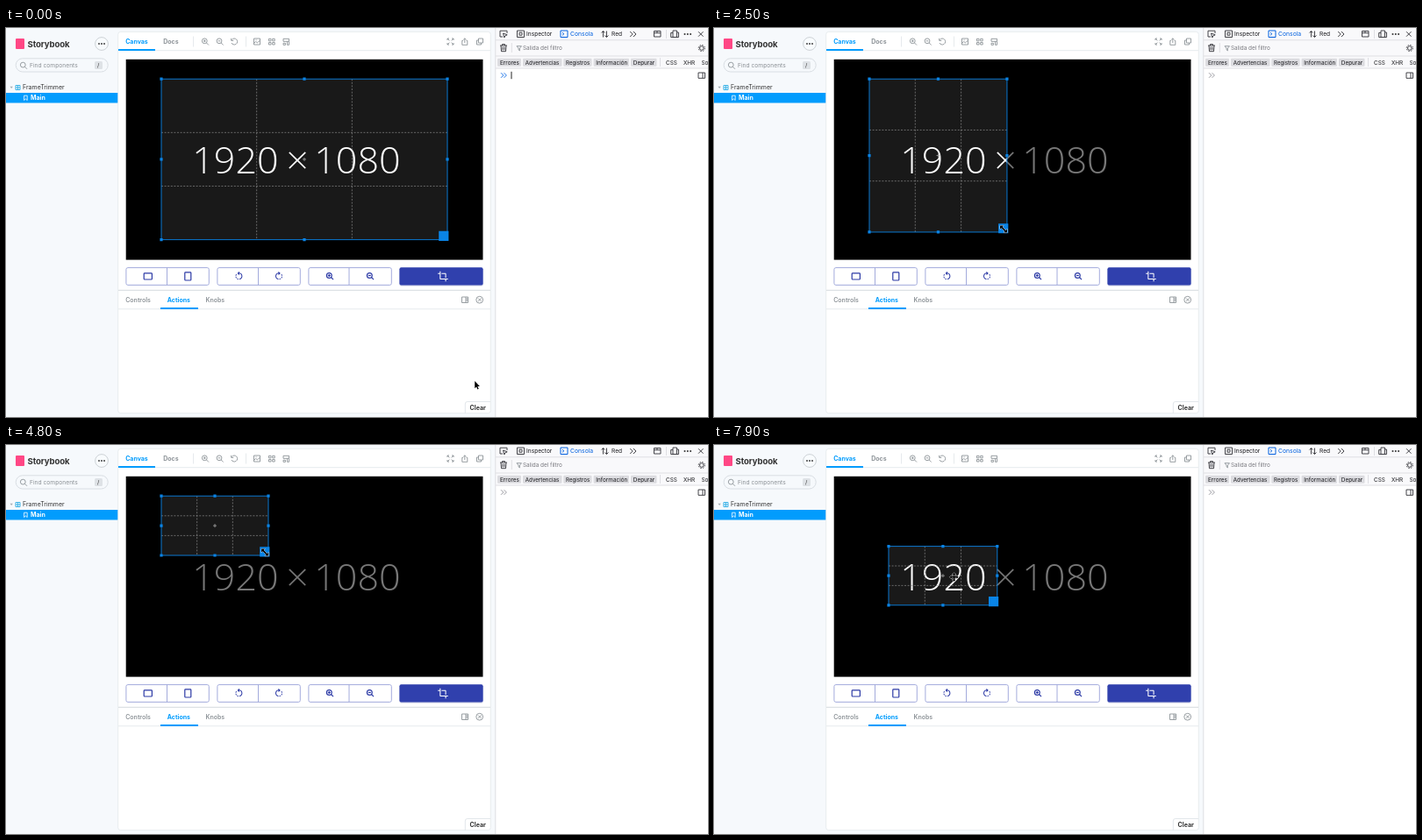
Write an HTML page that moves like this. It is 800x444 px and loops after 8000 ms.

```html
<!DOCTYPE html>
<html lang="es">
<head>
<meta charset="utf-8">
<title>Cropper demo</title>
<style>
  html, body { margin: 0; width: 100%; height: 100%; overflow: hidden; background: #f6f9fc; }
  svg { display: block; width: 800px; height: 444px; }
  text { font-family: Inter, "Open Sans", sans-serif; font-size: 7px; fill: #333; }
  .b { font-weight: 700; }
  .tool text { font-size: 6.4px; fill: #18181c; }
  .digits text { font: 300 43px "Open Sans", "Noto Sans", sans-serif; fill: inherit; }
  .line { fill: none; stroke-width: 1; }
  .gray { fill: none; stroke: #8d9398; stroke-width: .9; }
  .ink { fill: none; stroke: #2b39a5; stroke-width: 1.2; }
  .dark { fill: none; stroke: #3a3a40; stroke-width: .95; }
</style>
</head>
<body>
<svg viewBox="0 0 800 444">
  <defs>
    <clipPath id="clip"><rect id="clipBox"/></clipPath>
    <g id="digits" class="digits">
      <text x="212.3" y="165.5">1920</text>
      <text x="332" y="165.5" text-anchor="middle">×</text>
      <text x="351.3" y="165.5">1080</text>
    </g>
    <g id="lens"><circle cx="-.7" cy="-.7" r="2.9"/><path d="M1.5 1.5 4 4"/></g>
    <path id="turn" transform="scale(.5) translate(-12 -12)" d="M7.11 8.53L5.7 7.11C4.8 8.27 4.24 9.61 4.07 11h2.02c.14-.87.49-1.72 1.02-2.47zM6.09 13H4.07c.17 1.39.72 2.73 1.62 3.89l1.41-1.42c-.52-.75-.87-1.59-1.01-2.47zm1.01 5.32c1.16.9 2.51 1.44 3.9 1.61V17.9c-.87-.15-1.71-.49-2.46-1.03L7.1 18.32zM13 4.07V1L8.45 5.55 13 10V6.09c2.84.48 5 2.94 5 5.91s-2.16 5.43-5 5.91v2.02c3.95-.49 7-3.85 7-7.93s-3.05-7.44-7-7.93z"/>
  </defs>

  <rect width="800" height="444" fill="#f6f9fc"/>

  <!-- sidebar -->
  <rect x="11" y="12" width="10" height="12" rx="1" fill="#ff4785"/>
  <text x="24.5" y="21.6" class="b" style="font-size:9.6px;letter-spacing:-.1px">Storybook</text>
  <circle cx="109" cy="18" r="7.4" fill="#f8fbfd" stroke="#c8cdd2" stroke-width=".9"/>
  <g fill="#333"><circle cx="106" cy="18" r=".9"/><circle cx="109" cy="18" r=".9"/><circle cx="112" cy="18" r=".9"/></g>
  <rect x="11.2" y="34.8" width="105" height="15.2" rx="7.6" class="line" stroke="#d9dee3"/>
  <use href="#lens" class="gray" x="20" y="42.8"/>
  <text x="27" y="45" style="font-size:6.7px;fill:#8b9095">Find components</text>
  <rect x="101" y="38" width="9" height="9" rx="1.5" fill="#dee2e6"/>
  <text x="104" y="44.8" style="font-size:6.3px">/</text>
  <path d="M4.5 66.8h3.4l-1.7 2.2z" fill="#a5adb4"/>
  <path d="M11 65.5h5v5h-5zM13.5 65.5v5M11 68h5" class="line" stroke="#3cb4e8"/>
  <text x="19" y="70.2">FrameTrimmer</text>
  <rect y="74" width="128" height="11.5" fill="#029cfd"/>
  <path d="M20.6 77.2h3.6v5.3l-1.8-1.6-1.8 1.6z" class="line" stroke="#fff" style="stroke-width:.8"/>
  <text x="28" y="82.3" class="b" style="fill:#fff">Main</text>

  <!-- main panel -->
  <rect x="127.7" y="4.3" width="424.6" height="435.4" rx="3" fill="#fff" stroke="#e2e7eb" stroke-width=".8"/>
  <path d="M128 25.7h424M213.5 9.5v12M273.5 9.5v12M128 320.8h424" class="line" stroke="#e6eaed"/>
  <path d="M128 299.3h424" class="line" stroke="#d5dade"/>
  <path d="M128 25h42M176 320h43" class="line" stroke="#029cfd" style="stroke-width:1.8"/>
  <text x="136.2" y="18.3" class="b" style="fill:#029cfd">Canvas</text>
  <text x="179.2" y="18.3" class="b" style="fill:#8d9398">Docs</text>
  <g class="gray">
    <use href="#lens" x="227" y="15.5"/><path d="M224.9 14.8h2.8M226.3 13.4v2.8"/>
    <use href="#lens" x="243.7" y="15.5"/><path d="M241.6 14.8h2.8"/>
    <path d="M257.3 13.5a3.5 3.5 0 1 1-.3 3.5M256.7 11.8v2.6h2.6"/>
    <path d="M282.5 12h7v7h-7zM282.5 17.5l2.2-2 1.6 1.3 3.2-2.6M284.5 13.8h1"/>
    <path d="M299.5 12.3h2.5v2.5h-2.5zM303.7 12.3h2.5v2.5h-2.5zM299.5 16.5h2.5v2.5h-2.5zM303.7 16.5h2.5v2.5h-2.5z"/>
    <path d="M316 12.3h6.5v3h-6.5zM316 17.3h2.5v2h-2.5zM320.5 15.3v4h2v-4"/>
    <path d="M503 14v-2h2M508 12h2v2M510 17v2h-2M505 19h-2v-2M503 12l2.4 2.4M510 12l-2.4 2.4M510 19l-2.4-2.4M503 19l2.4-2.4"/>
    <path d="M521 14.3h-1.2v5h6v-5h-1.2M522.8 17v-5M521.2 13.4l1.6-1.6 1.6 1.6"/>
    <path d="M538.5 12h5v5h-5zM538.5 14h-2v5h5v-2"/>
    <path d="M519.5 307h7v6.5h-7zM524 307v6.5M524 309h2.5M524 311h2.5"/>
    <circle cx="539.7" cy="310.2" r="3.9"/><path d="M538 308.5l3.4 3.4M541.4 308.5l-3.4 3.4"/>
  </g>

  <!-- crop area -->
  <rect x="136.7" y="35.8" width="406.8" height="228.8"/>
  <use href="#digits" fill="#777"/>
  <rect id="face" fill="#191919"/>
  <use href="#digits" fill="#fff" clip-path="url(#clip)"/>
  <path id="grid" fill="none" stroke="#8a8a8a" stroke-width=".7" stroke-dasharray="2 1.6"/>
  <path id="cross" fill="none" stroke="#aaa" stroke-width=".8"/>
  <rect id="edge" fill="none" stroke="#0a78d1" stroke-width="1"/>
  <path id="knobs" fill="#0a84e6"/>

  <!-- action buttons -->
  <g class="line" stroke="#a3abdc" fill="none">
    <rect x="136.9" y="273.6" width="94.4" height="19.8" rx="2"/><path d="M183.5 273.6v19.8"/>
    <rect x="240.9" y="273.6" width="94.4" height="19.8" rx="2"/><path d="M287.5 273.6v19.8"/>
    <rect x="344.9" y="273.6" width="94.4" height="19.8" rx="2"/><path d="M391 273.6v19.8"/>
  </g>
  <rect x="448.4" y="274.4" width="95.4" height="20.2" rx="2" fill="#c6cae2"/>
  <rect x="448.4" y="273.2" width="95.2" height="20.3" rx="2" fill="#3040ad"/>
  <g class="ink">
    <rect x="157.2" y="279.8" width="9.2" height="7.2" rx=".8"/>
    <rect x="203.8" y="278.8" width="7" height="9.2" rx=".8"/>
    <use href="#lens" x="369" y="283.2"/><path d="M366.8 282.5h3M368.3 281v3"/>
    <use href="#lens" x="415" y="283.2"/><path d="M412.8 282.5h3"/>
  </g>
  <g fill="#2b39a5">
    <use href="#turn" x="265.4" y="283.2"/>
    <use href="#turn" transform="translate(311 283.2) scale(-1 1)"/>
  </g>
  <path transform="translate(491.7 277.2) scale(.52)" fill="#fff" d="M17 15h2V7c0-1.1-.9-2-2-2H9v2h8v8zM7 17V1H5v4H1v2h4v10c0 1.1.9 2 2 2h10v4h2v-4h4v-2H7z"/>

  <!-- addon panel -->
  <text x="136.2" y="312.8" style="fill:#8d9398;font-weight:600">Controls</text>
  <text x="183.8" y="312.8" class="b" style="fill:#029cfd">Actions</text>
  <text x="227.5" y="312.8" style="fill:#8d9398;font-weight:600">Knobs</text>
  <path d="M523.3 440v-11q0-2.5 2.5-2.5H552" class="line" stroke="#e2e7eb"/>
  <text x="528.6" y="435.6" class="b">Clear</text>

  <!-- developer tools -->
  <g class="tool">
    <rect x="558" width="242" height="444" fill="#fff"/>
    <rect x="558" width="242" height="46" fill="#f9f9fb"/>
    <path d="M557.8 0v444M558 13.8h242M558 32h242M558 46h242M576.3 17v11M752.5 2v10M745.5 34v10" class="line" stroke="#dfdfe3"/>
    <text x="593" y="9.2" style="font-size:6.6px">Inspector</text>
    <text x="643" y="9.2" style="font-size:6.8px;fill:#0060df">Consola</text>
    <text x="690" y="9.2" style="font-size:6.6px">Red</text>
    <text x="589" y="25.3" style="fill:#77777d">Salida del filtro</text>
    <g class="dark">
      <path d="M566 10h-3V3.2h8V6M566.5 6l1.3 5 1.2-2.2 2.2-1z"/>
      <path d="M582.5 3h8v7.5h-8zM585 5.2h3v3h-3z"/>
      <path d="M680.5 10.5V3.5l-2 2M680.5 3.5l2 2M684.5 3.5v7l-2-2M684.5 10.5l2-2"/>
      <path d="M711.2 4l3 3-3 3M715 4l3 3-3 3"/>
      <path d="M738.5 3.5h7.5V10h-7.5zM738.5 5.7h7.5M742 3.5v2.2"/>
      <path d="M760 3h4.5v7.5H760zM760 5.5h-2.3v5h4M764.5 5h2v5.5h-3"/>
      <path d="M789 4.2l5.5 5.5M794.5 4.2L789 9.7"/>
      <path d="M563 20h8M565.5 20v-1.4h3V20M564 20l.5 6.7h5l.5-6.7M566 21.5v3.8M568 21.5v3.8"/>
      <circle cx="792.8" cy="23" r="2.3"/>
      <circle cx="792.8" cy="23" r="3.6" stroke-dasharray="1.4 1.43"/>
      <path d="M789 51h7.5v6.3H789zM794 51v6.3"/>
    </g>
    <path d="M582 20.7h5.5l-2.1 2.4v2.8l-1.3-1v-1.8z" class="gray"/>
    <path d="M632 3h8v7.5h-8zM634 5.2l1.8 1.6-1.8 1.6" class="line" stroke="#0060df"/>
    <g fill="#333"><circle cx="773.5" cy="7" r="1"/><circle cx="776.8" cy="7" r="1"/><circle cx="780.1" cy="7" r="1"/></g>
    <g fill="#dcdce0">
      <rect x="560" y="34.8" width="27" height="9" rx="1"/><rect x="589" y="34.8" width="44.5" height="9" rx="1"/>
      <rect x="635.3" y="34.8" width="32.2" height="9" rx="1"/><rect x="669.6" y="34.8" width="40.4" height="9" rx="1"/>
      <rect x="712" y="34.8" width="29.5" height="9" rx="1"/>
    </g>
    <text x="563" y="41.6">Errores</text><text x="591.8" y="41.6" style="font-size:6.2px">Advertencias</text>
    <text x="638" y="41.6" style="font-size:6.2px">Registros</text><text x="672.3" y="41.6">Información</text>
    <text x="714.8" y="41.6">Depurar</text><text x="752" y="41.6">CSS</text>
    <text x="772" y="41.6">XHR</text><text x="792.5" y="41.6">So</text>
    <path id="prompt" d="M564 51.2l2.8 2.8-2.8 2.8M567.6 51.2l2.8 2.8-2.8 2.8" class="line"/>
    <path id="caret" d="M576 49.8v8.4" class="line" stroke="#222"/>
  </g>

  <!-- pointers -->
  <g stroke-linejoin="round" stroke="#fff" stroke-width=".8" style="paint-order:stroke">
    <path id="arrow" d="M0 0v8.2l1.9-1.7 1.3 2.9 1.3-.6-1.3-2.8h2.5z"/>
    <path id="resize" d="M-4 -4h4l-1.4 1.4 4 4L4 0v4H0l1.4-1.4-4-4L-4 0z"/>
    <path id="move" d="M0-5l2 2H.7v2.3H3V-2L5 0 3 2V.7H.7V3H2L0 5-2 3h1.3V.7H-3V2L-5 0l2-2v1.3h2.3V-3H-2z"/>
  </g>
</svg>

<script>
const LOOP = 8000, STEP = 100;
const $ = id => document.getElementById(id);

// each key: time, x, y
const corner = [[1100, 503, 241.6], [1900, 381.5, 235], [2600, 326, 232.6], [3100, 314.3, 232],
                [3600, 311, 212], [4300, 303, 146], [4800, 299, 126], [5100, 300.8, 125.4]];
const origin = [[5600, 177, 58.2], [6100, 182, 92], [6500, 189.1, 115], [6900, 193.5, 116],
                [7200, 193.5, 116], [7900, 199, 115.6]];
const approach = [[0, 534.2, 403], [100, 533, 396], [500, 512, 300], [800, 500, 243], [900, 499.3, 238.3]];
const leave = [[5100, 296.8, 121.9], [5400, 282, 95], [5500, 252, 93.4]];

function along(keys, t) {
  if (t <= keys[0][0]) return keys[0].slice(1);
  for (let i = 1; i < keys.length; i++) {
    const [t1, x1, y1] = keys[i], [t0, x0, y0] = keys[i - 1];
    if (t <= t1) {
      const k = (t - t0) / (t1 - t0);
      return [x0 + (x1 - x0) * k, y0 + (y1 - y0) * k];
    }
  }
  return keys[keys.length - 1].slice(1);
}

function setBox(id, x, y, width, height) {
  for (const [name, value] of Object.entries({ x, y, width, height })) $(id).setAttribute(name, value);
}

const square = (x, y, s) => `M${x - s / 2} ${y - s / 2}h${s}v${s}h${-s}z`;

function drawCrop(x, y, w, h) {
  const r = x + w, b = y + h, cx = x + w / 2, cy = y + h / 2;
  for (const id of ["face", "clipBox", "edge"]) setBox(id, x, y, w, h);
  $("grid").setAttribute("d", [1, 2].map(i =>
    `M${x + w * i / 3} ${y}v${h}M${x} ${y + h * i / 3}h${w}`).join(""));
  $("cross").setAttribute("d", `M${cx - 2} ${cy}h4M${cx} ${cy - 2}v4`);
  const dots = [[x, y], [cx, y], [r, y], [x, cy], [r, cy], [x, b], [cx, b]];
  $("knobs").setAttribute("d",
    dots.map(([px, py]) => square(px, py, 3.2)).join("") + square(r - 4.2, b - 4.2, 11.2));
}

function drawPointer(kind, x, y) {
  for (const id of ["arrow", "resize", "move"]) $(id).style.display = id === kind ? "" : "none";
  $(kind).setAttribute("transform", `translate(${x} ${y})`);
}

function render(time) {
  const t = Math.floor(time % LOOP / STEP) * STEP;
  const [r, b] = along(corner, t), [x, y] = along(origin, t);
  drawCrop(x, y, r - 177, b - 58.2);

  if (t < 1000) drawPointer(t < 800 ? "arrow" : "resize", ...along(approach, t));
  else if (t <= 5100) drawPointer("resize", r - 3.9, b - 3.4);
  else if (t < 5600) drawPointer("move", ...along(leave, t));
  else drawPointer("move", x + 74.6, y + 35.2);

  const focused = t < 1000;
  $("prompt").setAttribute("stroke", focused ? "#2b7de9" : "#a0a0a6");
  $("caret").style.display = focused && t < 500 ? "" : "none";
}

const start = performance.now();
function tick() {
  render(performance.now() - start);
  requestAnimationFrame(tick);
}
tick();
</script>
</body>
</html>
```
